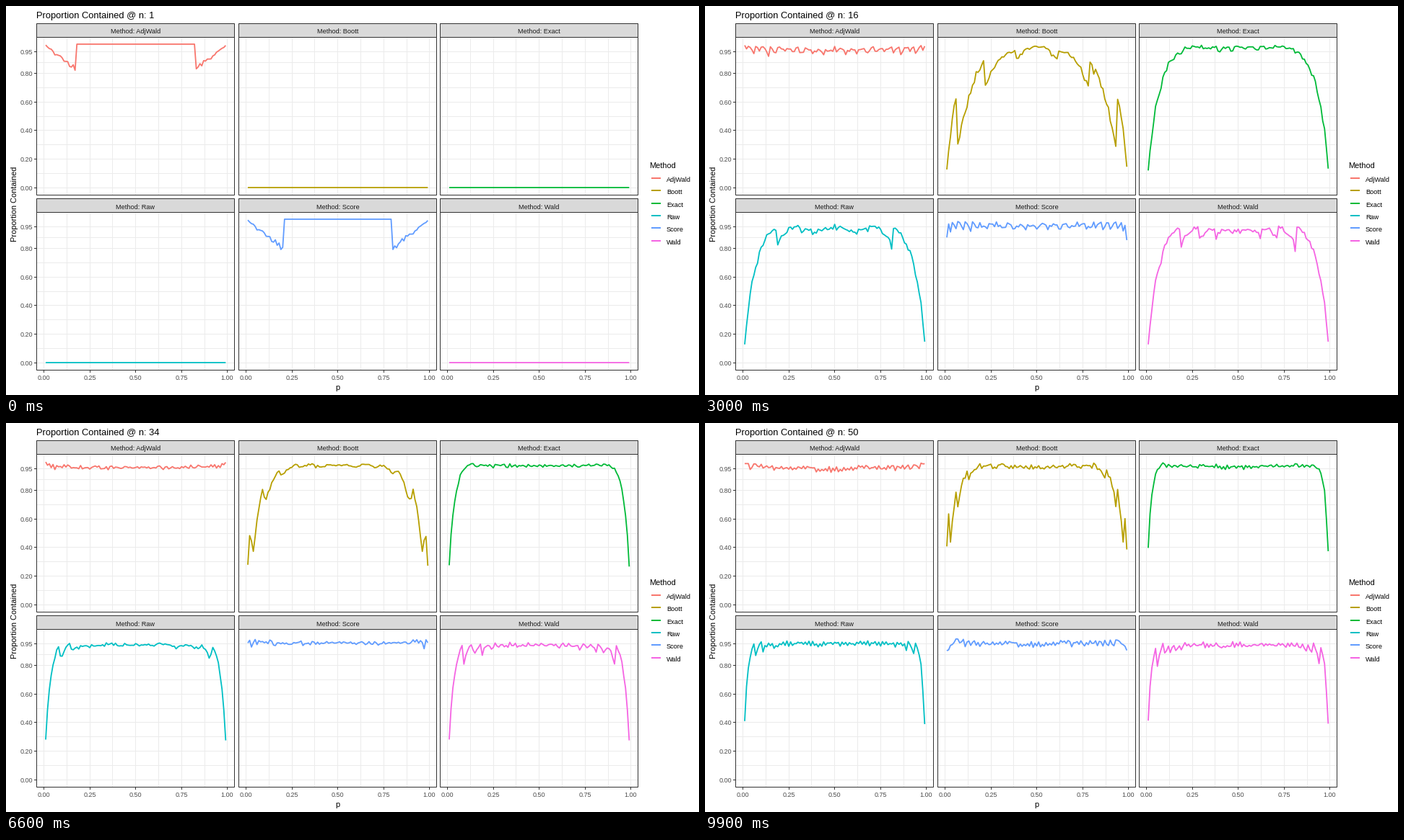
Animation, 960 px wide and 540 px high, one loop 10000 ms. Source, as a matplotlib script:

```python
import math

import matplotlib.pyplot as plt
import numpy as np
from matplotlib.animation import FuncAnimation
from matplotlib.patches import Rectangle

W, H, DPI = 960, 540, 100
PT = 72 / DPI  # points per pixel
FRAMES, INTERVAL = 100, 100
N_MAX, TRIALS, Z = 50, 1000, 1.959964
P = np.arange(1, 100) / 100
EPS = 1e-9

METHODS = {
    "AdjWald": "#F8766D",
    "Boott": "#B79F00",
    "Exact": "#00BA38",
    "Raw": "#00BFC4",
    "Score": "#619CFF",
    "Wald": "#F564E3",
}

plt.rcParams["font.family"] = "Liberation Sans"
erf = np.vectorize(math.erf)


# ---- coverage of the interval methods ----

def pmf(n, p):
    """Binomial probabilities, one row per count 0..n."""
    p = np.atleast_1d(p)
    x = np.arange(n + 1)[:, None]
    comb = np.array([math.comb(n, k) for k in range(n + 1)], float)[:, None]
    return comb * p**x * (1 - p) ** (n - x)


def sd(p, n):
    return np.sqrt(p * (1 - p) / n)


def often(q):
    """Chance that a share q fills the outer 2.5% of the resamples."""
    q = np.clip(q, 0, 1)
    z = (TRIALS * q - 25.5) / np.sqrt(TRIALS * q * (1 - q) + EPS)
    return 0.5 * (1 + erf(z / math.sqrt(2)))


def two_sided(upper):
    """Chance of containing p, the lower limits mirroring the upper ones."""
    hit = np.clip(upper + upper[::-1, ::-1] - 1, 0, 1)
    hit[[0, -1]] = 0
    return hit


def bootstrap(n):
    """Percentile and studentized bootstrap containment."""
    raw = np.zeros((n + 1, len(P)))
    stud = np.zeros_like(raw)
    k = np.ceil(P * n - EPS).astype(int)
    star = np.arange(1, n) / n
    for x in range(1, n):
        ph = x / n
        boot = pmf(n, ph)[:, 0]
        raw[x] = often(np.cumsum(boot[::-1])[::-1][k])
        inner = boot[1:n] / boot[1:n].sum()
        cum = np.concatenate([[0], np.cumsum(inner)])
        limit = ph - (star - ph) / sd(star, n) * sd(ph, n)
        stud[x] = often(cum[(limit[:, None] >= P - EPS).sum(axis=0)])
    return two_sided(raw), two_sided(stud)


def containment(n):
    x = np.arange(n + 1)[:, None]
    ph, adj = x / n, (x + 2) / (n + 4)
    probs = pmf(n, P)
    cdf = np.cumsum(probs, axis=0)
    exact = (cdf > 0.025) & (1 - cdf + probs > 0.025) & (x > 0) & (x < n)
    raw, stud = bootstrap(n)
    return {
        "AdjWald": np.abs(P - adj) <= Z * sd(adj, n + 4),
        "Boott": stud,
        "Exact": exact,
        "Raw": raw,
        "Score": np.abs(P - ph) <= Z * sd(P, n),
        "Wald": np.abs(P - ph) <= Z * sd(ph, n),
    }


def simulate():
    rng = np.random.default_rng(11)
    out = {m: np.zeros((N_MAX, len(P))) for m in METHODS}
    for n in range(1, N_MAX + 1):
        probs = pmf(n, P)
        probs /= probs.sum(axis=0)
        counts = np.array([rng.multinomial(TRIALS, col) for col in probs.T]).T
        for m, hit in containment(n).items():
            out[m][n - 1] = (counts * hit).sum(axis=0) / TRIALS
    return out


coverage = simulate()
KEYS = np.round((FRAMES - 1) * np.arange(N_MAX) / (N_MAX - 1))


def tween(method, frame):
    """Coverage curve, blended linearly between neighbouring sample sizes."""
    pos = np.interp(frame, KEYS, np.arange(N_MAX))
    a = min(int(pos), N_MAX - 2)
    f = pos - a
    return (1 - f) * coverage[method][a] + f * coverage[method][a + 1]


# ---- drawing, in pixels with y pointing down ----

fig = plt.figure(figsize=(W / DPI, H / DPI), dpi=DPI, facecolor="white")
ax = fig.add_axes([0, 0, 1, 1])
ax.set_xlim(0, W)
ax.set_ylim(H, 0)
ax.axis("off")

LEFTS, TOPS = (42.5, 322.5, 601.5), (43.5, 286.5)
PANEL_W, PANEL_H, STRIP_H = 274, 219, 19
X_UNIT, Y_UNIT = 274.3 / 1.078, PANEL_H / 1.1
X_BREAKS = (0, 0.25, 0.5, 0.75, 1)
Y_BREAKS = (0, 0.2, 0.4, 0.6, 0.8, 0.95)
DARK, GRID = "#333333", "#EBEBEB"


def px(left, p):
    return left + (p + 0.039) * X_UNIT


def py(top, v):
    return top + (1.05 - v) * Y_UNIT


def pixel(v):
    return math.floor(v) + 0.5


def line(xs, ys, color, width=1, **kw):
    return ax.plot(xs, ys, color=color, lw=width * PT, snap=False,
                   solid_capstyle="butt", **kw)[0]


def text(x, y, s, size, color="black", **kw):
    return ax.text(x, y, s, fontsize=size * PT, color=color,
                   va="baseline", **kw)


def box(x, y, w, h, fill, z):
    ax.add_patch(Rectangle((x, y), w, h, facecolor=fill, edgecolor=DARK,
                           lw=PT, zorder=z, snap=False))


def mids(breaks):
    return [(a + b) / 2 for a, b in zip(breaks, breaks[1:])]


def panel(left, top, name):
    for p in mids(X_BREAKS) + list(X_BREAKS):
        x = pixel(px(left, p))
        line([x, x], [top, top + PANEL_H], GRID, zorder=1)
    for v in mids(Y_BREAKS) + list(Y_BREAKS):
        y = pixel(py(top, v))
        line([left, left + PANEL_W], [y, y], GRID, zorder=1)
    box(left, top, PANEL_W, PANEL_H, "none", 4)
    box(left, top - STRIP_H, PANEL_W, STRIP_H, "#D9D9D9", 5)
    text(left + PANEL_W / 2, top - 5, f"Method: {name}", 9.2, "#1A1A1A",
         ha="center", zorder=6)
    return line(px(left, P), P * 0, METHODS[name], 1.8, zorder=3,
                solid_joinstyle="round")


curves = {}
for i, name in enumerate(METHODS):
    top = TOPS[i // 3]
    curves[name] = (panel(LEFTS[i % 3], top, name), top)

for top in TOPS:
    for v in Y_BREAKS:
        y = pixel(py(top, v))
        line([39, 42], [y, y], DARK)
        text(37, y + 3.5, f"{v:.2f}", 9, "#4D4D4D", ha="right")

for left in LEFTS:
    for p in X_BREAKS:
        x = pixel(px(left, p))
        line([x, x], [506, 509], DARK)
        text(x, 519, f"{p:.2f}", 9, "#4D4D4D", ha="center")

text(459, 533, "p", 11, ha="center")
text(15, 274.5, "Proportion Contained", 11, ha="center", rotation=90,
     rotation_mode="anchor")

text(891.5, 225, "Method", 11)
for i, (name, color) in enumerate(METHODS.items()):
    y = round(239.2 + 17.28 * i)
    line([894, 907], [y, y], color, 2)
    text(915, y + 5, name, 9.1)

title = text(42, 17, "", 12.9)


def update(frame):
    n = round(1 + (N_MAX - 1) * frame / (FRAMES - 1))
    title.set_text(f"Proportion Contained @ n: {n}")
    for name, (curve, top) in curves.items():
        curve.set_ydata(py(top, tween(name, frame)) - 0.5)
    return [title] + [c for c, _ in curves.values()]


anim = FuncAnimation(fig, update, frames=FRAMES, interval=INTERVAL,
                     repeat=True, repeat_delay=0, blit=False)
plt.show()
```
